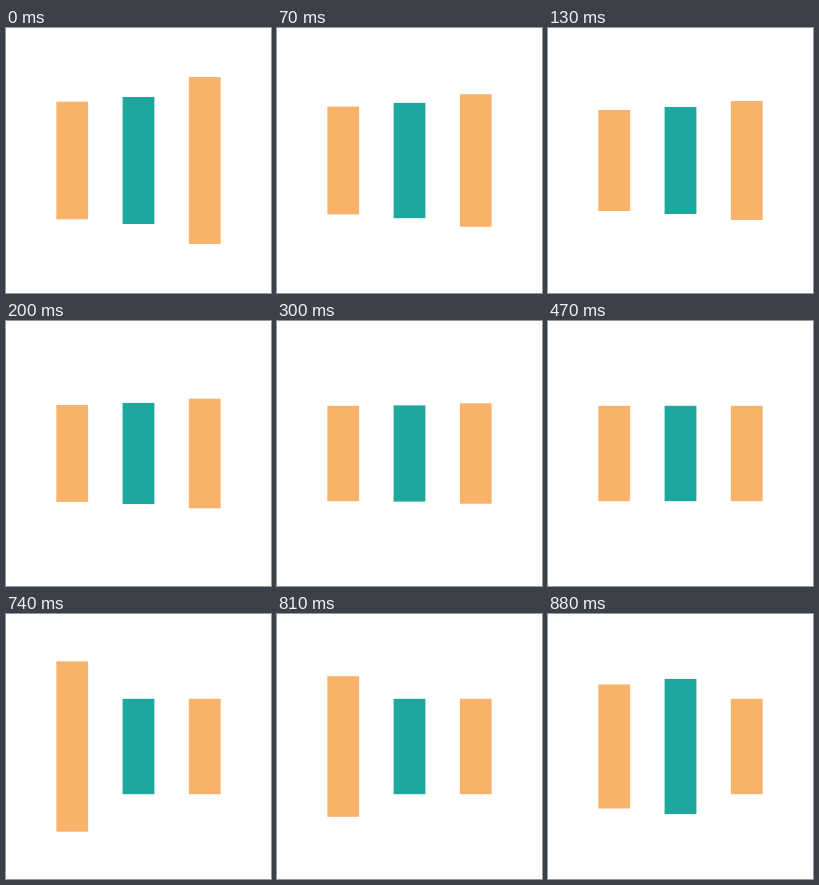
Animation, 265 px wide and 265 px high, one loop 910 ms. Source, as an HTML page:

```html
<!DOCTYPE html>
<html lang="en">
<head>
<meta charset="utf-8">
<title>Pulse bars</title>
<style>
  html, body { margin: 0; width: 100%; height: 100%; overflow: hidden; background: #fff; }
  svg { display: block; width: 100%; height: 100%; }
</style>
</head>
<body>
<svg viewBox="0 0 100 100">
  <rect x="19" width="12" fill="#f8b26a"/>
  <rect x="44" width="12" fill="#1ea79f"/>
  <rect x="69" width="12" fill="#f8b26a"/>
</svg>
<script>
  const LOOP = 910, STEPS = 27, STEP_MS = 33.69;
  const REST = 36;
  const rects = document.querySelectorAll('rect');
  const bars = [
    { peak: 72, lead: 0.2 },
    { peak: 63, lead: 0.1 },
    { peak: 63, lead: 0 }
  ];

  // cubic-bezier(0, 0.5, 0.5, 1), solved by bisection
  function ease(x) {
    if (x >= 1) return 1;
    let lo = 0, hi = 1;
    for (let i = 0; i < 24; i++) {
      const s = (lo + hi) / 2;
      if (1.5 * s * s - 0.5 * s ** 3 < x) lo = s; else hi = s;
    }
    const s = lo, r = 1 - s;
    return 1.5 * r * r * s + 3 * r * s * s + s ** 3;
  }

  // Steps begin on whole hundredths of a second
  const stepStart = i => Math.round(i * STEP_MS / 10) * 10;

  function stepAt(ms) {
    let i = STEPS - 1;
    while (i > 0 && stepStart(i) > ms) i--;
    return i;
  }

  function draw() {
    const time = stepAt(performance.now() % LOOP) / STEPS;
    bars.forEach(({ peak, lead }, i) => {
      const phase = (time + lead) % 1;
      const height = peak + (REST - peak) * ease(phase * 2);
      rects[i].setAttribute('y', 50 - height / 2);
      rects[i].setAttribute('height', height);
    });
    requestAnimationFrame(draw);
  }
  draw();
</script>
</body>
</html>
```
